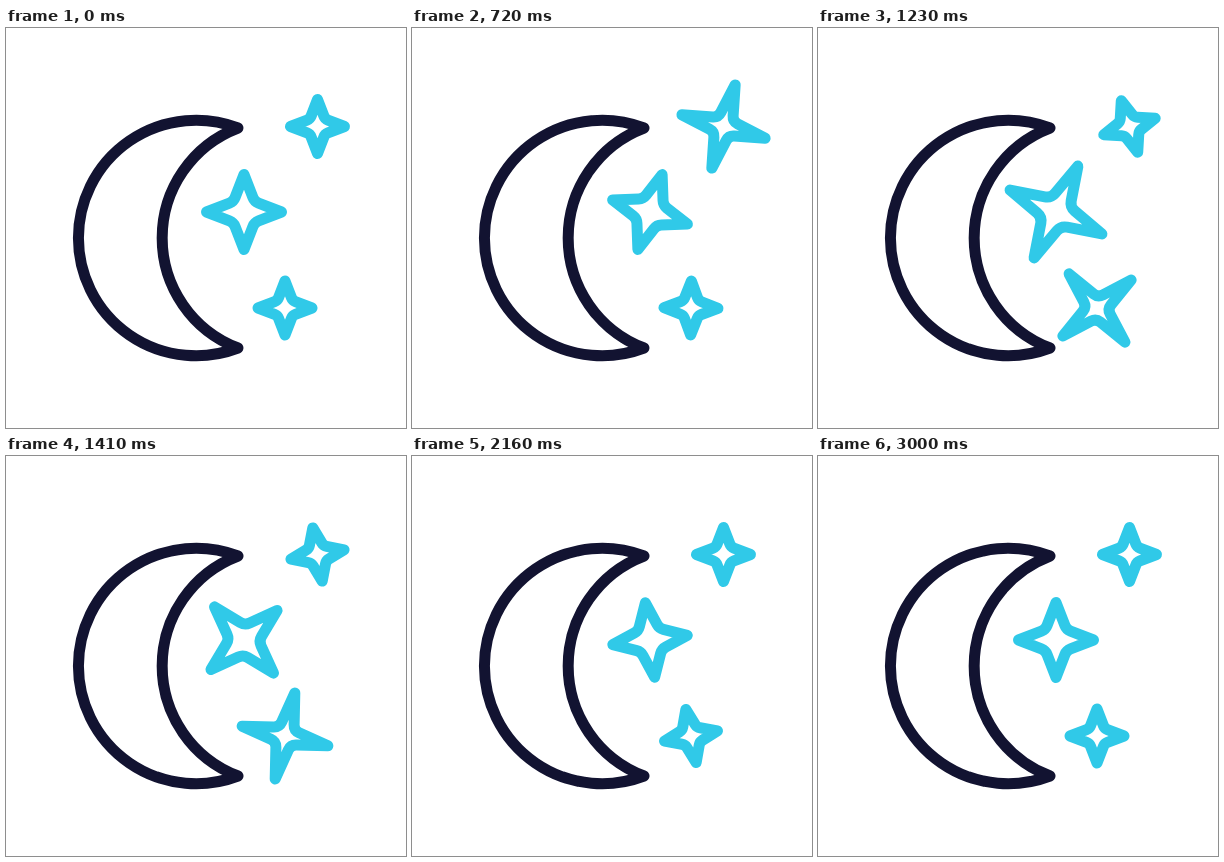
An HTML page that plays this animation: 400x400 px, repeating every 3090 ms.

```html
<!DOCTYPE html>
<html lang="en">
<head>
<meta charset="utf-8">
<title>Moon and stars</title>
<style>
  html, body { margin: 0; width: 100%; height: 100%; overflow: hidden; background: #fff; }
  svg { display: block; width: 100vw; height: 100vh; }
  path { fill: none; stroke: #30c9e8; stroke-width: 11; stroke-linecap: round; stroke-linejoin: round; }
  .moon { stroke: #121331; }
</style>
</head>
<body>
<svg viewBox="0 0 400 400">
  <path class="moon" d="M232 100A117.7 117.7 0 1 0 232 320A117.7 117.7 0 0 1 232 100Z"/>
</svg>
<script>
const LOOP = 3090;
const STRETCH = 20.7;

// x1 and x2 are the handles of the curve cubic-bezier(x1, 0, x2, 1)
const stars = [
  { x: 311.5, y: 98.5, tip: 27, notch: 7.5, start: 0, end: 2110, x1: .45, x2: .05 },
  { x: 238, y: 184, tip: 37.5, notch: 10.5, start: 0, end: 3000, x1: .6, x2: .055 },
  { x: 279, y: 280, tip: 27, notch: 7.5, start: 600, end: 3000, x1: .48, x2: .03 }
];

const svg = document.querySelector('svg');
for (const star of stars) {
  star.path = document.createElementNS(svg.namespaceURI, 'path');
  svg.append(star.path);
}

const clamp = v => Math.min(1, Math.max(0, v));
const smooth = v => v * v * (3 - 2 * v);

function ease(u, x1, x2) {
  let lo = 0, hi = 1;
  for (let i = 0; i < 24; i++) {
    const s = (lo + hi) / 2, r = 1 - s;
    if (3 * r * r * s * x1 + 3 * r * s * s * x2 + s * s * s < u) lo = s;
    else hi = s;
  }
  return smooth(lo);
}

// Four sharp tips joined by slightly rounded notches
function outline(tip, notch) {
  const k = .15, near = notch * (1 - k), far = notch + (tip - notch) * k;
  let d = '';
  for (let i = 0; i < 4; i++) {
    const c = [1, 0, -1, 0][i], s = [0, 1, 0, -1][i];
    const at = (x, y) => `${x * c - y * s} ${x * s + y * c} `;
    d += (i ? 'L' : 'M') + at(0, -tip) + 'L' + at(near, -far) +
      'Q' + at(notch, -notch) + at(far, -near);
  }
  return d + 'Z';
}

function draw(now) {
  const t = now % LOOP;
  for (const { path, x, y, tip, notch, start, end, x1, x2 } of stars) {
    const turn = ease(clamp((t - start) / (end - start)), x1, x2);
    const grow = smooth(clamp((turn - .04) / .33)) * clamp((.9 - turn) / .4);
    path.setAttribute('d', outline(tip + STRETCH * grow, notch));
    path.setAttribute('transform', `translate(${x} ${y}) rotate(${180 * turn})`);
  }
}

const begin = performance.now();
function tick() {
  draw(performance.now() - begin);
  requestAnimationFrame(tick);
}
tick();
</script>
</body>
</html>
```
